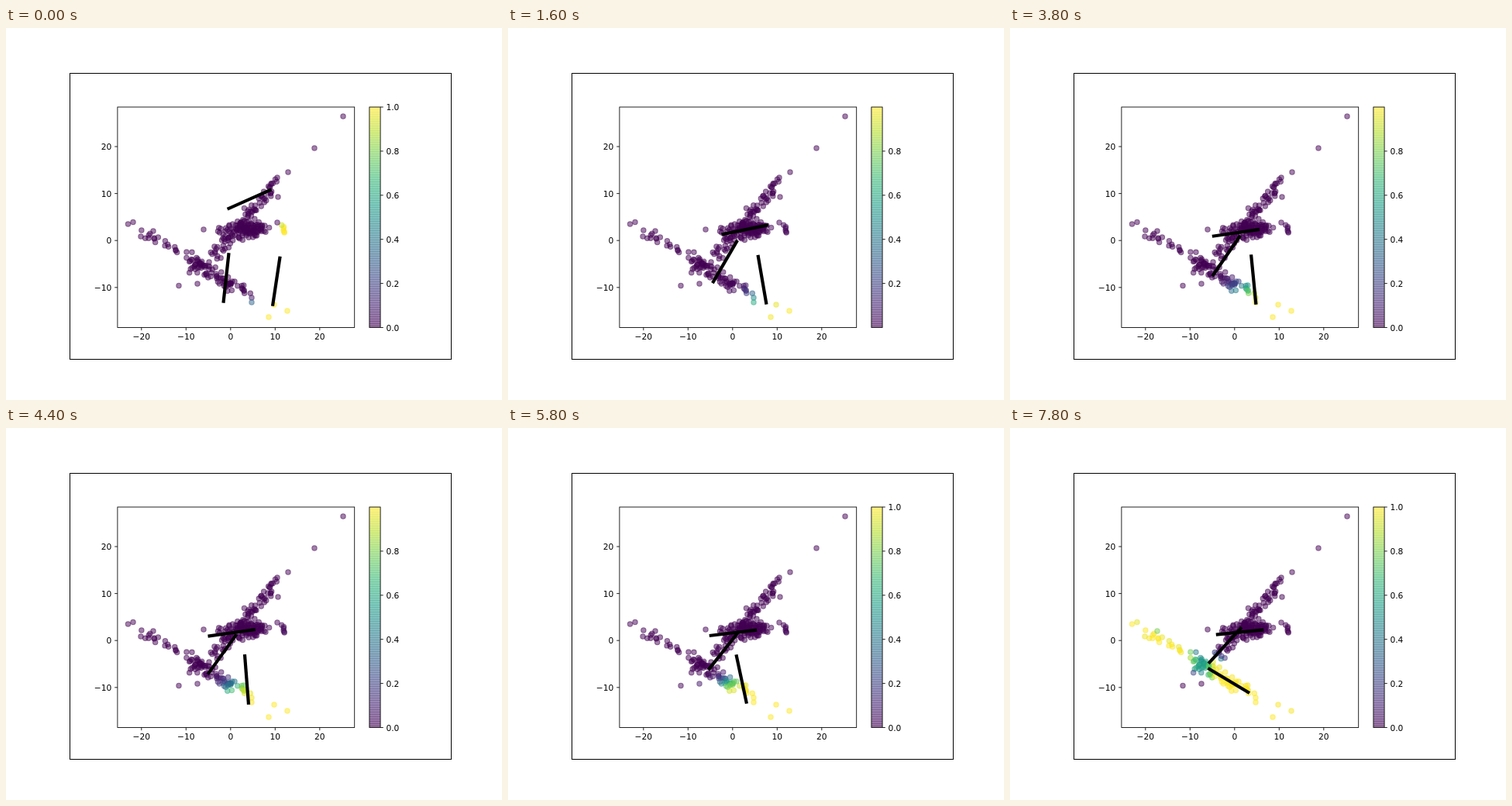
An HTML page that plays this animation: 640x480 px, repeating every 8000 ms.

```html
<!DOCTYPE html>
<html lang="en">
<head>
<meta charset="utf-8">
<title>Mixture fit</title>
<style>
  html, body { margin: 0; width: 100%; height: 100%; overflow: hidden; background: #fff; }
  svg { display: block; width: 640px; height: 480px; }
  text { font: 10.69px "DejaVu Sans", sans-serif; fill: #000; }
  .frame { fill: none; stroke: #000; stroke-width: 1; }
  .axis { fill: none; stroke: #000; stroke-width: .86; }
  .dots circle { stroke-width: 1.07; fill-opacity: .5; stroke-opacity: .5; }
  .fit { stroke: #000; stroke-width: 4.2; stroke-linecap: square; }
</style>
</head>
<body>
<svg id="stage" viewBox="0 0 640 480"></svg>
<script>
const stage = document.getElementById('stage');
const plot = { x: 143.9, y: 102, width: 305.8, height: 284.5 };
const bar = { x: 468.9, y: 102, width: 14.2, height: 284.5 };
const bottom = plot.y + plot.height;
const unitX = 5.75, unitY = 6.06;

function add(tag, attrs, parent = stage) {
  const el = document.createElementNS('http://www.w3.org/2000/svg', tag);
  for (const key in attrs) el.setAttribute(key, attrs[key]);
  parent.appendChild(el);
  return el;
}

function label(text, x, y, anchor) {
  const el = add('text', { x, y, 'text-anchor': anchor });
  el.textContent = text;
  return el;
}

const mix = (a, b, p) => a + (b - a) * p;
const sigmoid = z => 1 / (1 + Math.exp(-z));

// Viridis
const stops = ['440154', '482878', '3e4989', '31688e', '26828e',
  '1f9e89', '35b779', '6ece58', 'b5de2b', 'fde725']
  .map(hex => hex.match(/../g).map(c => parseInt(c, 16)));
function viridis(v) {
  const s = Math.min(Math.max(v, 0), 1) * 9;
  const i = Math.min(Math.floor(s), 8);
  return `rgb(${stops[i].map((c, k) => Math.round(mix(c, stops[i + 1][k], s - i)))})`;
}

// Seeded clusters
let seed = 11;
function random() {
  seed = (seed + 0x6D2B79F5) | 0;
  let r = Math.imul(seed ^ (seed >>> 15), 1 | seed);
  r = (r + Math.imul(r ^ (r >>> 7), 61 | r)) ^ r;
  return ((r ^ (r >>> 14)) >>> 0) / 4294967296;
}
// Bell shape with bounded tails
const bell = () => (random() + random() + random() + random() - 2) * 1.73;

const points = [];
function cloud(n, x, y, sx, sy) {
  while (n--) points.push([x + bell() * sx, y + bell() * sy]);
}
function band(n, x0, y0, x1, y1, spread) {
  while (n--) {
    const u = random();
    points.push([mix(x0, x1, u) + bell() * spread, mix(y0, y1, u) + bell() * spread]);
  }
}

cloud(110, 311, 261, 13.5, 5);
band(38, 304, 253, 333, 214, 4);
band(14, 335, 216, 348, 196, 4.5);
band(32, 266, 296, 292, 266, 4.5);
band(18, 176, 263, 232, 294, 4);
band(48, 233, 296, 296, 334, 4.5);
cloud(16, 246, 307, 6.5, 5);
cloud(14, 286, 329, 5, 4);
cloud(8, 307, 337, 4, 3.5);
cloud(6, 357.5, 260, 2.5, 4);
// Lone points
points.push([435, 114], [398, 155], [364, 186], [350, 193], [351, 218], [350, 251],
  [157.5, 253], [164, 250.5], [174, 269], [190, 262], [255, 260], [223, 332.5], [247, 330],
  [317, 348], [317, 354], [346, 357], [339, 373], [363, 365]);

// Tracks: time, then values that move evenly to the next row
function along(track, t) {
  let i = 0;
  while (i < track.length - 2 && t >= track[i + 1][0]) i++;
  const [t0, ...a] = track[i], [t1, ...b] = track[i + 1];
  let p = Math.min((t - t0) / (t1 - t0), 1);
  if (i === 0) p = 1 - (1 - p) ** 2;
  return a.map((v, k) => mix(v, b[k], p));
}

// Centre x, centre y and direction in degrees of each component
const components = [
  [[0, 314, 221, -23], [1600, 305.7, 260.3, -11], [3000, 291.8, 264.3, -8.5],
    [6600, 290, 264.3, -6], [7800, 296.5, 263.5, -5.5]],
  [[0, 284, 322.5, 96.6], [1600, 280, 301.5, 121.5], [7800, 277.5, 280.5, 134]],
  [[0, 348.8, 326.8, 99], [1600, 328, 324.8, 79.7], [4400, 310.5, 324.5, 85.3],
    [5800, 301.2, 324, 77.3], [6600, 290.8, 326.2, 42.9], [7800, 282.2, 326, 29.6]]
];

// Membership border of the third component: slope, offset, softness
const border = [[0, .354, 443, 1], [1600, 1, 666, 11], [3000, 1.6, 854, 17],
  [4400, 1.6, 823, 12], [5800, 2, 936, 11], [6600, 2, 920, 14]];

// Final membership follows the tail on the left
function tailShare(x, y) {
  const below = y - (253 + .587 * (x - 157));
  if (x > 262) return sigmoid((22 + below) / 3);
  const dip = .45 * Math.exp(-(((x - 247) / 13) ** 2));
  return Math.exp(-((below / 15) ** 4)) * (1 - dip);
}

// Static picture
add('rect', { class: 'frame', x: 82.5, y: 58.5, width: 492, height: 369 });

const dotGroup = add('g', { class: 'dots' });
const dots = points.map(([cx, cy]) => add('circle', { cx, cy, r: 3.2 }, dotGroup));
const fits = components.map(() => add('line', { class: 'fit' }));

add('rect', { class: 'axis', ...plot });
for (let v = -20; v <= 20; v += 10) {
  const name = String(v).replace('-', '\u2212');
  const x = 289.8 + v * unitX;
  const y = 274.2 - v * unitY;
  add('path', { class: 'axis', d: `M${x} ${bottom}v3.7` });
  label(name, x, 402.3, 'middle');
  if (v > -20) {
    add('path', { class: 'axis', d: `M${plot.x} ${y}h-3.7` });
    label(name, 136.4, y + 4, 'end');
  }
}

for (let y = 102; y < 386; y++) {
  add('rect', { x: 469, y, width: 14, height: 1, fill: viridis((386 - y) / 284),
    'fill-opacity': y % 3 ? .56 : .68, 'shape-rendering': 'crispEdges' });
}
add('rect', { class: 'axis', ...bar });
const ticks = [0, 1, 2, 3, 4, 5].map(i => {
  const y = bottom - i * bar.height / 5;
  return [add('path', { class: 'axis', d: `M483.1 ${y}h3.7` }),
    label((i / 5).toFixed(1), 490.4, y + 4, 'start')];
});
function showTick(i, on) {
  for (const el of ticks[i]) el.setAttribute('visibility', on ? 'visible' : 'hidden');
}

function draw(t) {
  const [slope, offset, soft] = along(border, t);
  const tail = Math.max(0, (t - 6600) / 1200);
  dots.forEach((dot, n) => {
    const [x, y] = points[n];
    const share = sigmoid((x + slope * y - offset) / soft) * sigmoid((y - 240) / 3);
    const color = viridis(mix(share, tailShare(x, y), Math.min(tail, 1)));
    dot.setAttribute('fill', color);
    dot.setAttribute('stroke', color);
  });

  // Each line spans ten data units
  fits.forEach((fit, n) => {
    const [x, y, degrees] = along(components[n], t);
    const dx = 5 * unitX * Math.cos(degrees * Math.PI / 180);
    const dy = 5 * unitY * Math.sin(degrees * Math.PI / 180);
    const ends = { x1: x - dx, y1: y - dy, x2: x + dx, y2: y + dy };
    for (const key in ends) fit.setAttribute(key, ends[key]);
  });

  showTick(0, t < 400 || t >= 3800);
  showTick(5, t < 400 || t >= 5000);
}

const start = performance.now();
let shown = -1;
function tick() {
  const t = Math.floor(((performance.now() - start) % 8000) / 200) * 200;
  if (t !== shown) draw(shown = t);
  requestAnimationFrame(tick);
}
tick();
</script>
</body>
</html>
```
